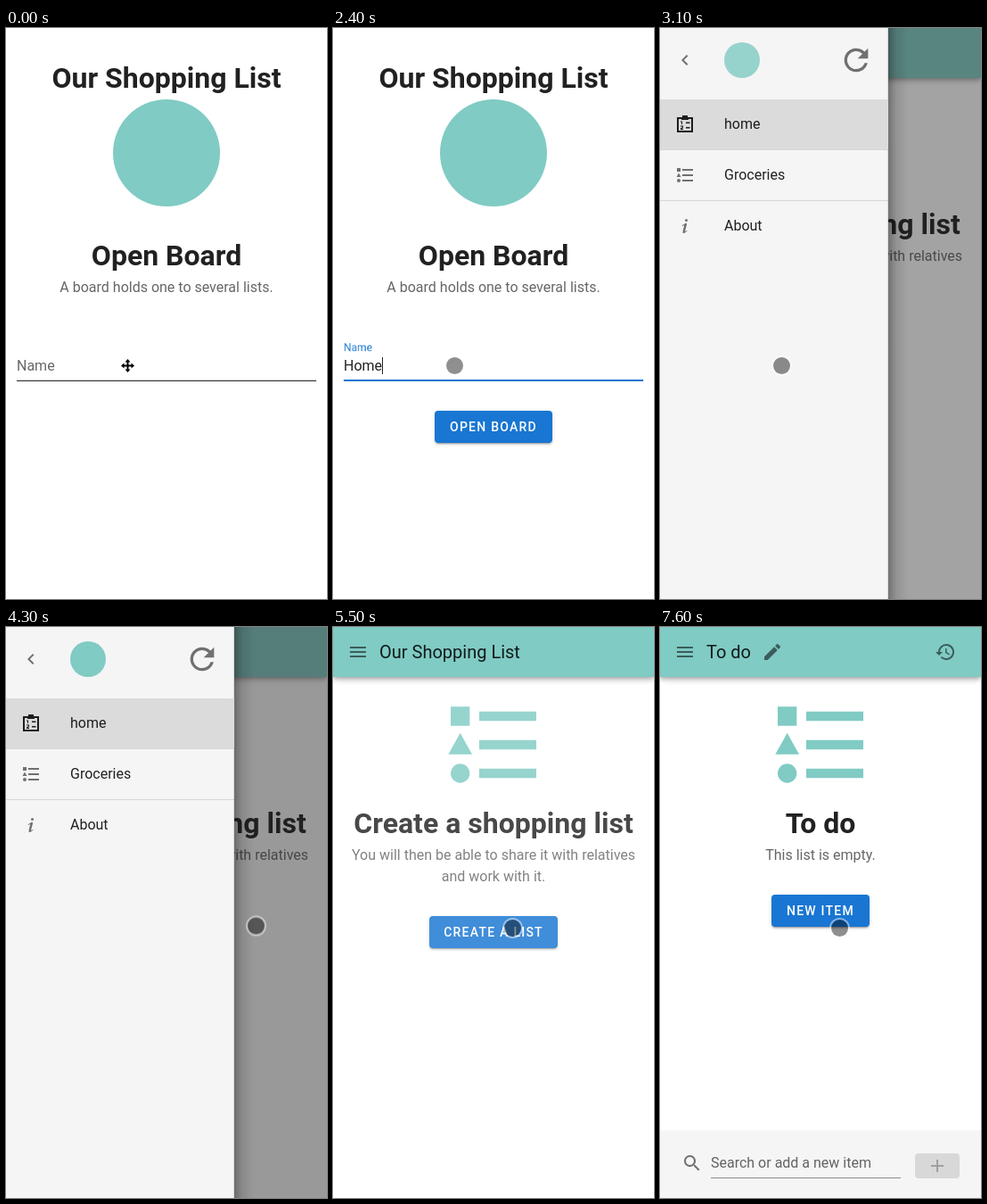
An HTML page that plays this animation: 360 by 640 pixels, repeating every 8 s.

```html
<!DOCTYPE html>
<html lang="en">
<head>
<meta charset="utf-8">
<title>Shopping list</title>
<style>
  html, body { margin: 0; width: 100%; height: 100%; overflow: hidden; background: #fff; }
  #stage { position: relative; width: 360px; height: 640px; overflow: hidden; background: #fff;
           font-family: Roboto, sans-serif; color: rgba(0,0,0,.87); }
  #stage div, #stage svg { position: absolute; }
  .layer { left: 0; top: 0; width: 360px; height: 640px; }
  .text { white-space: pre; line-height: normal; }
  .mid { left: 0; width: 360px; text-align: center; }
  .h1 { font-weight: 700; }
  .soft { color: rgba(0,0,0,.6); }
  .hint { color: rgba(0,0,0,.38); }
  .caret { border-right: 1px solid #222; }
  .bar { background: #80cbc4;
         box-shadow: 0 2px 4px -1px rgba(0,0,0,.2), 0 4px 5px rgba(0,0,0,.14), 0 1px 10px rgba(0,0,0,.12); }
  .btn { background: #1976d2; border-radius: 4px; color: #fff; text-align: center;
         font: 500 14px/36px Roboto, sans-serif; letter-spacing: 1.25px; white-space: nowrap;
         box-shadow: 0 3px 1px -2px rgba(0,0,0,.2), 0 2px 2px rgba(0,0,0,.14), 0 1px 5px rgba(0,0,0,.12); }
  .round { background: #80cbc4; border-radius: 50%; }
  .line { background: #1976d2; }
  .drawer { background: #f5f5f5; }
  .rule { background: rgba(0,0,0,.12); }
  .shade { background: linear-gradient(90deg, rgba(0,0,0,.3), rgba(0,0,0,.1) 40%, transparent); }
  .touch { background: rgba(0,0,0,.44); border-radius: 50%; box-shadow: 0 0 0 2px rgba(255,255,255,.45); }
</style>
</head>
<body>
<div id="stage"></div>
<script>
const LOOP = 8000;
const GREY = 'rgba(0,0,0,.54)', DARK = 'rgba(0,0,0,.87)', TEAL = '#80cbc4';
const SWIFT = 'cubic-bezier(.25,.8,.5,1)';
const stage = document.getElementById('stage');

const ICONS = {
  menu: 'M3 6H21V8H3zM3 11H21V13H3zM3 16H21V18H3z',
  back: 'M15.4 16.6L10.8 12L15.4 7.4L14 6L8 12L14 18z',
  refresh: 'M17.65 6.35A8 8 0 1 0 19.73 14H17.65A6 6 0 1 1 16.22 7.78L13 11H20V4z',
  list: 'M5 9.5L7.5 14H2.5zM3 4H7V8H3zM5 20A2 2 0 1 0 5 16A2 2 0 1 0 5 20M9 5V7H21V5zM9 19V17H21V19zM9 11V13H21V11z',
  info: 'M13.5 4A1.5 1.5 0 1 0 13.5 7A1.5 1.5 0 1 0 13.5 4M13.1 8.8C12 8.9 8.7 11.5 8.7 11.5L9 12L10.1 11.4C12.2 10 10.5 13.1 9.6 18.4C9.2 21 11.6 19.7 12.2 19.3L14.6 17.6L14.2 17.1C13.5 17.5 12.3 18.4 12.2 17.9C12 17.3 13.2 13.4 13.9 10.7C14 10 14.3 8.7 13.1 8.8',
  history: 'M13.5 8H12V13L16.3 15.5L17 14.3L13.5 12.2zM13 3A9 9 0 0 0 4 12H1L5 16L9 12H6A7 7 0 1 1 8.06 16.94L6.64 18.36A9 9 0 1 0 13 3',
  pencil: 'M20.7 7C21.1 6.6 21.1 6 20.7 5.6L18.4 3.3C18 2.9 17.4 2.9 17 3.3L15.1 5.1L18.9 8.9M3 17.25V21H6.75L17.8 9.9L14.1 6.2z',
  search: 'M9.5 3A6.5 6.5 0 0 1 14.44 13.73L14.7 14H15.5L20.5 19L19 20.5L14 15.5V14.7L13.73 14.44A6.5 6.5 0 1 1 9.5 3M9.5 5A4.5 4.5 0 1 0 9.5 14A4.5 4.5 0 1 0 9.5 5',
  plus: 'M19 13H13V19H11V13H5V11H11V5H13V11H19z',
  clip: 'M3 4H9V2H15V4H21V21H3zM5 6V19H19V6H16V7H8V6zM13 9.5H17.5V11H13zM13 15H17.5V16.5H13zM7 8.5H9V12H8V9.5H7zM7 13.5H10V16L8.3 17H10V18H7V16.5L9 15.3V14.5H7z',
  move: 'M12 0L16.8 5.6H13.6V10.4H18.4V7.2L24 12L18.4 16.8V13.6H13.6V18.4H16.8L12 24L7.2 18.4H10.4V13.6H5.6V16.8L0 12L5.6 7.2V10.4H10.4V5.6H7.2z'
};

function box(parent, cls, x, y, w, h) {
  const el = document.createElement('div');
  el.className = cls;
  Object.assign(el.style, { left: x + 'px', top: y + 'px', width: w + 'px', height: h + 'px' });
  return parent.appendChild(el);
}

const layer = parent => box(parent, 'layer', 0, 0, 360, 640);

// y is the baseline; x null centres the text on the stage
function text(parent, str, x, y, size, cls = '') {
  const el = document.createElement('div');
  el.className = 'text ' + cls + (x === null ? ' mid' : '');
  el.textContent = str;
  if (x !== null) el.style.left = x + 'px';
  el.style.top = y - Math.round(size * .9277) + 'px';
  el.style.fontSize = size + 'px';
  return parent.appendChild(el);
}

function button(parent, str, x, y, w) {
  const el = box(parent, 'btn', x, y, w, 36);
  el.textContent = str;
  return el;
}

function icon(parent, name, x, y, size = 24, fill = GREY) {
  const holder = box(parent, '', x, y, size, size);
  holder.innerHTML = `<svg width="${size}" height="${size}" viewBox="0 0 24 24"><path fill="${fill}" fill-rule="evenodd" d="${ICONS[name]}"/></svg>`;
  return holder;
}

// rows: [ms, value, easing to the next row]
function track(el, prop, rows) {
  const all = [[0, rows[0][1]], ...rows, [LOOP, rows[rows.length - 1][1]]];
  el.animate(all.map(([ms, v, easing = 'linear']) => ({ offset: ms / LOOP, [prop]: v, easing })),
             { duration: LOOP, iterations: Infinity });
  return el;
}

// spans: on, off, on, off ...
function show(el, ...spans) {
  const rows = [[0, 0, 'step-end']];
  spans.forEach((ms, i) => { if (ms < LOOP) rows.push([ms, i % 2 ? 0 : 1, 'step-end']); });
  return track(el, 'opacity', rows);
}

function typed(parent, keys, end, x, y, size, cls) {
  keys.forEach(([ms, str], i) => {
    const next = i + 1 < keys.length ? keys[i + 1][0] : end;
    const el = text(parent, str, x, y, size, cls);
    if (!str) el.style.height = '19px';
    show(el, ms, next);
  });
}

const grow = (el, from, to) =>
  track(el, 'transform', [[from, 'scaleX(0)', SWIFT], [to, 'scaleX(1)']]);

// Opening page
const start = show(layer(stage), 0, 3000);
text(start, 'Our Shopping List', null, 67, 32, 'h1');
box(start, 'round', 120, 80, 120, 120);
text(start, 'Open Board', null, 266, 32, 'h1');
text(start, 'A board holds one to several lists.', null, 296, 16, 'soft');
box(start, '', 12, 395, 336, 1).style.background = '#212121';
grow(box(start, 'line', 12, 394, 336, 2), 980, 1500);
const label = text(start, 'Name', 12, 384, 16);
label.style.transformOrigin = '0 0';
track(label, 'transform', [[980, 'none', SWIFT], [1400, 'translateY(-18px) scale(.75)']]);
track(label, 'color', [[980, 'rgba(0,0,0,.6)', SWIFT], [1400, '#1976d2']]);
typed(start, [[1000, ''], [1500, ' ']], 1500, 12, 384, 16, 'caret');
typed(start, [[2000, 'H'], [2200, 'Ho'], [2400, 'Home']], 3000, 12, 384, 16, 'caret');
show(button(start, 'OPEN BOARD', 114, 429, 132), 2000, 3000);

// Board: bar and its titles
const board = show(layer(stage), 3000, LOOP);
const bar = box(board, 'bar', 0, 0, 360, 56);
const name = [[6500, 'T'], [6700, 'To'], [6800, 'To '], [6900, 'To d'], [7000, 'To do']];
icon(bar, 'menu', 16, 16);
typed(bar, [[3000, 'Our Shopping List'], [5600, '(New List)'], ...name], LOOP, 52, 35, 20);
show(icon(bar, 'history', 308, 16), 5600, LOOP);
show(icon(bar, 'pencil', 114, 16), 7600, LOOP);

// Empty board
const create = layer(board);
icon(create, 'list', 116, 68, 128, TEAL);
text(create, 'Create a shopping list', null, 231, 32, 'h1');
text(create, 'You will then be able to share it with relatives', null, 261, 16, 'soft');
text(create, 'and work with it.', null, 285, 16, 'soft');
button(create, 'CREATE A LIST', 108, 324, 144);
track(create, 'opacity', [[5450, 1], [5750, 0]]);

// Naming form
const form = layer(board);
track(form, 'opacity', [[5750, 0], [6050, 1], [7599, 1], [7600, 0]]);
icon(form, 'list', 116, 80, 128, TEAL);
text(form, 'Name your list', null, 243, 32, 'h1');
show(text(form, 'My shopping list...', 24, 293, 16, 'hint'), 5600, 6500);
grow(box(form, 'line', 24, 303, 312, 2), 5750, 6100);
typed(form, name, 7600, 24, 293, 16, 'caret');
show(button(form, 'CREATE', 134, 326, 92), 6500, 7600);

// New list
const list = show(layer(board), 7600, LOOP);
icon(list, 'list', 116, 68, 128, TEAL);
text(list, 'To do', null, 231, 32, 'h1');
text(list, 'This list is empty.', null, 261, 16, 'soft');
button(list, 'NEW ITEM', 125, 300, 110);
box(list, 'drawer', 0, 564, 360, 76);
icon(list, 'search', 24, 589);
text(list, 'Search or add a new item', 57, 606, 16, 'soft');
box(list, '', 57, 617, 213, 1).style.background = '#8c8c8c';
const add = box(list, '', 286, 590, 50, 28);
add.style.cssText += 'background:#d7d8d7;border-radius:4px';
icon(add, 'plus', 13, 2, 24, '#a0a0a0');

// Dimming and side drawer
const dim = layer(board);
dim.style.background = '#212121';
track(dim, 'opacity', [[3000, .2], [3100, .41], [3200, .45], [3400, .46], [4450, .46], [4500, .33], [4600, .077], [4700, 0]]);

const drawer = box(board, 'drawer', 0, 0, 256, 640);
track(drawer, 'transform', [[3000, 'translateX(-110px)', 'ease-out'], [3100, 'none'], [4450, 'none'],
  [4500, 'translateX(-70px)'], [4600, 'translateX(-236px)'], [4650, 'translateX(-256px)'], [4700, 'translateX(-290px)']]);
const shade = box(drawer, 'shade', 256, 0, 22, 640);
track(shade, 'opacity', [[3000, .5], [3100, 1], [4450, 1], [4600, 0]]);
box(drawer, 'rule', 255, 0, 1, 640);
icon(drawer, 'back', 16, 24);
track(box(drawer, 'round', 72, 16, 40, 40), 'opacity', [[3000, .6], [3100, .8], [3700, 1]]);
icon(drawer, 'refresh', 200, 16, 40);
box(drawer, '', 0, 80, 256, 56).style.background = '#dbdbdb';
[['home', 'clip', DARK], ['Groceries', 'list', GREY], ['About', 'info', GREY]].forEach(([str, glyph, fill], i) => {
  const y = 80 + i * 57;
  icon(drawer, glyph, 16, y + 16, 24, fill);
  text(drawer, str, 72, y + 33, 16);
  if (i < 2) box(drawer, 'rule', 0, y + 56, 256, 1);
});

// Pointers
show(icon(stage, 'move', 128.5, 370.5, 15, '#000'), 0, 500);
show(icon(stage, 'move', 193.5, 329.5, 15, '#000'), 6400, 6500);
const touch = show(box(stage, 'touch', 0, 0, 19, 19), 1000, 1800, 2200, 6400, 6900, LOOP);
const at = (x, y) => `translate(${x - 9.5}px, ${y - 9.5}px)`;
track(touch, 'transform', [[3900, at(136.5, 378.5), 'ease-in-out'], [4300, at(280.5, 335)],
  [4600, at(280.5, 335), 'ease-in-out'], [5000, at(201.5, 337.5)]]);
</script>
</body>
</html>
```
